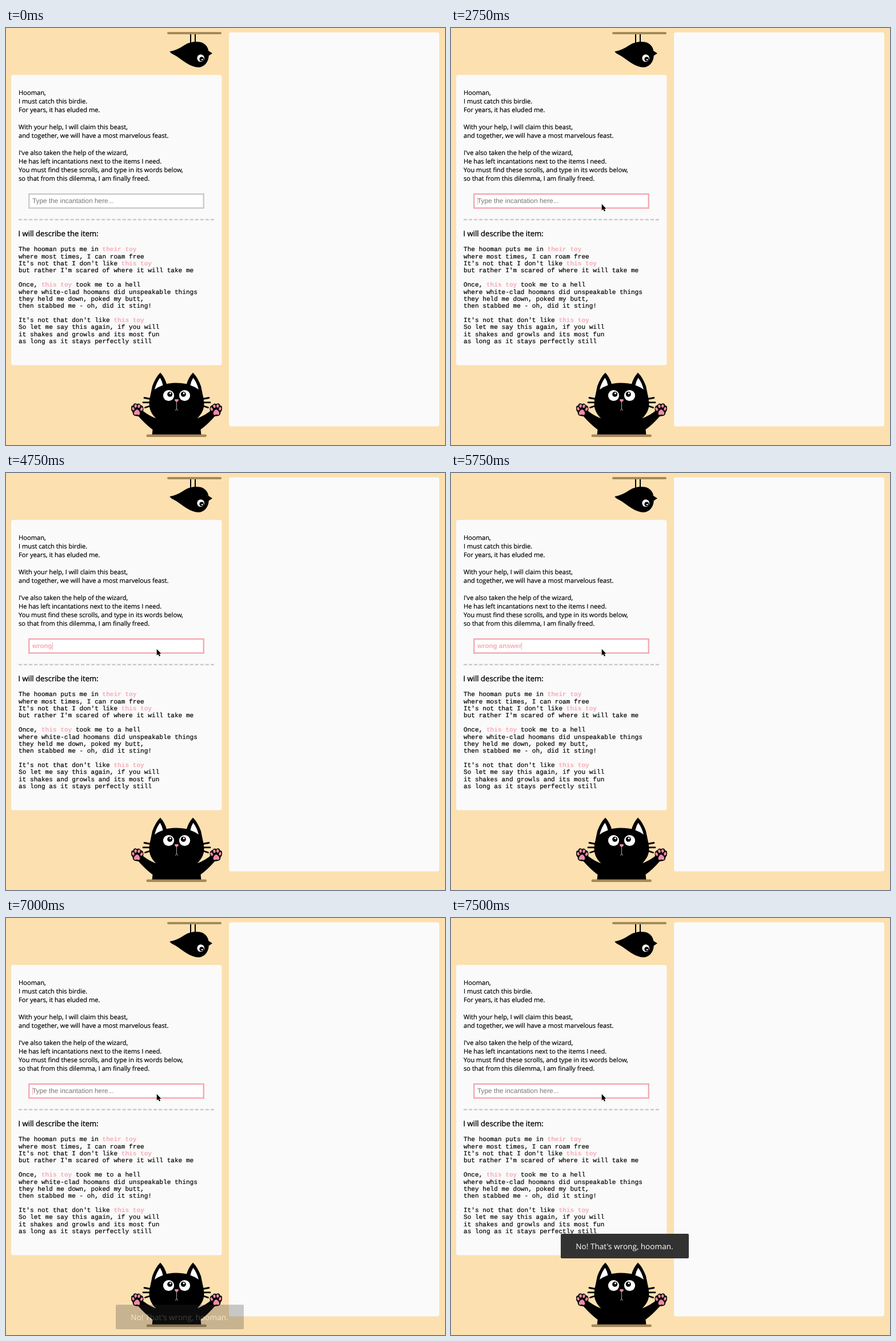
Write an HTML page that moves like this. It is 768x729 px and loops after 8 s.

```html
<!DOCTYPE html>
<html lang="en">
<head>
<meta charset="utf-8">
<title>Birdie riddle</title>
<style>
  html, body { margin: 0; width: 768px; height: 729px; overflow: hidden; background: #fce0b0; }
  svg { display: block; }
  text { white-space: pre; text-rendering: geometricPrecision; }
  .note { font: 11.13px "Open Sans", sans-serif; stroke: #000; stroke-width: .2px; }
  .head { font: 13.1px "Open Sans", sans-serif; stroke: #000; stroke-width: .35px; }
  .poem { font: 11.1px "Liberation Mono", monospace; stroke: #000; stroke-width: .2px; }
  .poem .hot { font-weight: bold; fill: #f6abb3; stroke: none; }
  .hint { font: 11.82px "Liberation Sans", sans-serif; fill: #777; }
  .typed { font: bold 11.53px "Liberation Sans", sans-serif; fill: #f6abb3; }
  .toast { font: 13.6px "Open Sans", sans-serif; fill: #fff; }
</style>
</head>
<body>
<svg width="768" height="729" viewBox="0 0 768 729">
  <defs>
    <g id="half">
      <path d="M251 650 L256 626 Q262 610 270 602.5 Q278 611 281.500 624 Z"/>
      <path d="M260 632 Q263 620 269.500 611.500 Q273.500 618 274.500 624.500 Q267 627 260 632 Z" fill="#fff"/>
      <path d="M256 649 L242 646.500 M254 654.700 H240 M256 659.500 L243.500 663.500" stroke="#000" stroke-width="2.800" stroke-linecap="round"/>
      <path d="M238 668 Q248 677 264 683 L266 712 H255.500 L256.500 702 Q244 693 231 678 Z"/>
      <path d="M219 664 Q219 659.500 222.500 660 Q223 655.800 227 656.300 Q229 657.500 230 657 Q234 655.500 236 659.500 Q241 660.500 240.500 667 Q240 671 238 673 Q236 679.500 229 678.500 Q221.500 678.500 221.500 671.500 Q218.500 668.500 219 664 Z"/>
      <g fill="#ee8ca6">
        <ellipse cx="222.500" cy="665.700" rx="2.100" ry="3" transform="rotate(-15 222.500 665.700)"/>
        <ellipse cx="226.700" cy="660.800" rx="2.200" ry="3"/>
        <ellipse cx="232.500" cy="661.200" rx="2.200" ry="3" transform="rotate(10 232.500 661.200)"/>
        <ellipse cx="237.200" cy="666.300" rx="2.100" ry="3" transform="rotate(25 237.200 666.300)"/>
        <path d="M229.500 667 C232.500 667 236 674 233.500 676 C231.500 677.300 231 675.700 229 675.700 C227 675.700 225.500 677.300 224 675.300 C222.500 672.500 226.500 667 229.500 667 Z"/>
      </g>
      <circle cx="284.500" cy="642.500" r="9.600" fill="#fff"/>
      <circle cx="286.700" cy="640.300" r="4.500"/>
    </g>
  </defs>

  <rect width="768" height="729" fill="#fce0b0"/>
  <rect x="9" y="82" width="368.500" height="507.500" rx="4" fill="#fafafa"/>
  <rect x="390" y="7.500" width="368" height="689" rx="4" fill="#fafafa"/>

  <g id="bird">
    <path d="M323 10 V27 M331 10 V27" stroke="#000" stroke-width="2"/>
    <rect x="282" y="7" width="95" height="4" rx="2" fill="#a48a5a"/>
    <path d="M286.300 41 C297 39.500 305 34.500 313 29.500 C322 23.800 336 22.300 345 26.500 C351 30 353.500 35 354.300 40 L361 44.300 L354.700 48.500 C354.500 58.500 347.500 68.500 337 68.700 C323 68.700 310 57.500 298.500 49.500 C293 46 288.500 45 286.300 41 Z"/>
    <circle cx="340.700" cy="52.700" r="6.400" fill="#fff"/>
    <circle cx="342.300" cy="54.300" r="3.900"/>
    <circle cx="343.200" cy="55.200" r="1.300" fill="#fff"/>
  </g>

  <g id="cat">
    <path d="M250.500 657 C250.500 634 268 620.500 298.500 620.500 C329 620.500 346.500 634 346.500 657 C346.500 668 341 676 335 682 L341.500 712 H255.500 L262 682 C256 676 250.500 668 250.500 657 Z"/>
    <use href="#half"/>
    <use href="#half" transform="translate(597 0) scale(-1 1)"/>
    <circle cx="287.500" cy="638.700" r="1.600" fill="#fff"/>
    <circle cx="311.100" cy="638.700" r="1.600" fill="#fff"/>
    <path d="M298.500 653 V665 L296.500 669 M298.500 665 L300.500 669" fill="none" stroke="#aaa" stroke-width="1"/>
    <path d="M296.500 649 H300.500 Q303 649.500 301.500 651.500 Q298.500 656 295.500 651.500 Q294 649.500 296.500 649 Z" fill="#ee8ca6"/>
    <rect x="245.500" y="710.500" width="105.500" height="4.500" rx="2.250" fill="#a48a5a"/>
  </g>

  <g id="copy"></g>
  <text class="head" x="21.500" y="363.700">I will describe the item:</text>
  <path d="M22 335 H364" stroke="#c9c9c9" stroke-width="2.700" stroke-dasharray="6 3.081"/>

  <rect id="box" x="40.250" y="290.250" width="305.500" height="24.500" fill="#fff" stroke-width="2.500"/>
  <text class="hint" id="hint" x="46" y="306.300">Type the incantation here...</text>
  <text class="typed" id="typed" x="46" y="306.300"></text>
  <rect id="caret" y="296" width="1" height="13"/>

  <g id="toast">
    <rect x="192" width="224" height="43" rx="2" fill="#323232"/>
    <text class="toast" x="218.300" y="27">No! That's wrong, hooman.</text>
  </g>
  <path id="pointer" d="M0 0 V11.300 L2.500 9 L4.300 12.900 L6.300 12 L4.600 8.200 H7.900 Z" stroke="#fff" stroke-width="1.400" paint-order="stroke"/>
</svg>
<script>
const LOOP = 8000;
const PINK = '#f6abb3';
const $ = id => document.getElementById(id);

const note = `Hooman,
I must catch this birdie.
For years, it has eluded me.

With your help, I will claim this beast,
and together, we will have a most marvelous feast.

I've also taken the help of the wizard,
He has left incantations next to the items I need.
You must find these scrolls, and type in its words below,
so that from this dilemma, I am finally freed.`;

const poem = `The hooman puts me in *their toy*
where most times, I can roam free
It's not that I don't like *this toy*
but rather I'm scared of where it will take me

Once, *this toy* took me to a hell
where white-clad hoomans did unspeakable things
they held me down, poked my butt,
then stabbed me - oh, did it sting!

It's not that don't like *this toy*
So let me say this again, if you will
it shakes and growls and its most fun
as long as it stays perfectly still`;

// Words between asterisks become highlighted spans.
function lines(src, cls, top, step) {
  return src.split('\n').map((s, i) =>
    `<text class="${cls}" x="22" y="${top + i * step}">` +
    s.replace(/\*(.+?)\*/g, '<tspan class="hot">$1</tspan>') + '</text>').join('');
}
$('copy').innerHTML = lines(note, 'note', 117.4, 15) + lines(poem, 'poem', 390.4, 12.36);

// Each track is a list of [time, ...values]; a value holds until the next time.
const pointer = [[0, -50, -50], [500, 512.2, 274.7], [750, 279.2, 318.7], [1000, 246.2, 310.7],
  [1250, 246.2, 309.7], [1500, 253.7, 309.7], [1750, 263.7, 307.7]];
const border = [[0, '#ccc'], [1750, '#cec6c8'], [2000, PINK]];
const typing = [[0, ''], [3500, 't'], [4250, ''], [4500, 'wr'], [4750, 'wrong'], [5000, 'wrong a'],
  [5250, 'wrong ans'], [5500, 'wrong answe'], [5750, 'wrong answer'], [7000, '']];
const caret = [[0, 0], [1750, 46], [2250, 0], [2750, 46], [3250, 0], [3500, 50], [4000, 0],
  [4500, 60], [4750, 81], [5000, 90], [5250, 103], [5500, 119], [5750, 123], [6250, 0],
  [6750, 123], [7000, 46], [7500, 0]];
const toast = [[0, 0, 0], [7000, 676, .25], [7250, 564, .93], [7500, 552, 1]];

const at = (track, t) => track.filter(k => k[0] <= t).pop().slice(1);

function draw(t) {
  const [px, py] = at(pointer, t);
  $('pointer').setAttribute('transform', `translate(${px} ${py})`);

  $('box').setAttribute('stroke', at(border, t)[0]);
  const [word] = at(typing, t);
  $('typed').textContent = word;
  $('hint').setAttribute('opacity', word ? 0 : 1);

  const [cx] = at(caret, t);
  $('caret').setAttribute('x', cx);
  $('caret').setAttribute('opacity', cx ? 1 : 0);
  $('caret').setAttribute('fill', t < 2000 ? '#222' : PINK);

  const [y, alpha] = at(toast, t);
  $('toast').setAttribute('transform', `translate(0 ${y})`);
  $('toast').setAttribute('opacity', alpha);
}

const start = performance.now();
function tick() {
  draw((performance.now() - start) % LOOP);
  requestAnimationFrame(tick);
}
tick();
</script>
</body>
</html>
```
